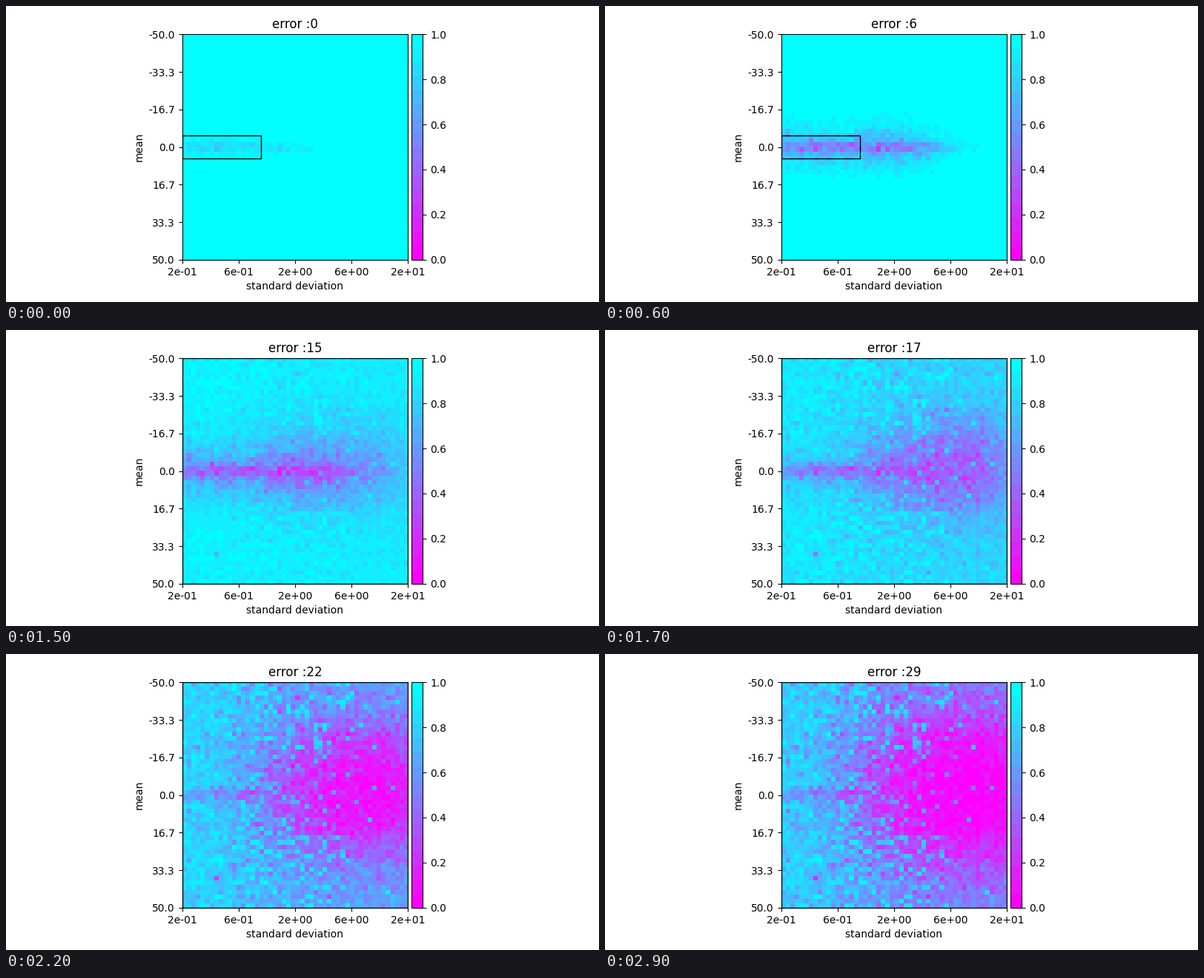
Write a matplotlib script that moves like this. It is 800 px wide and 400 px high and loops after 3000 ms.

```python
import numpy as np
import matplotlib.pyplot as plt
from matplotlib.animation import FuncAnimation
from matplotlib.patches import Rectangle

W, H, N, FRAMES, SWITCH = 800, 400, 50, 30, 15

fig = plt.figure(figsize=(W / 100, H / 100), dpi=100, facecolor="white")


def place(x, y, w, h):
    return fig.add_axes([x / W, y / H, w / W, h / H])


# Square map plus a bar of 5% its width, centred together
SIDE, GAP, BOTTOM = 304.5, 5, 57.2
left = (W - 1.05 * SIDE - GAP) / 2
ax = place(left, BOTTOM, SIDE, SIDE)
bar_ax = place(left + SIDE + GAP, BOTTOM, 0.05 * SIDE, SIDE)

# Cell centres: x spans the log-scaled deviation, m the mean
centres = (np.arange(N) + 0.5) / N
x, m = np.meshgrid(centres, centres * 100 - 50)

rng = np.random.default_rng(7)
narrow_gain = np.exp(rng.normal(0, 0.3, (N, N)))
wide_gain = np.exp(rng.normal(0, 1, (N, N)) * (0.45 - 0.25 * x))
stuck = rng.random((N, N)) < 0.16 * np.exp(-((x - 0.5) / 0.28) ** 2)
wide_gain[stuck] *= 0.25
narrow_gain[stuck] *= 0.7

KEYS = [0, 3, 9, 14, 15, 19, 22, 29]
STRENGTH = [0.19, 0.62, 0.88, 0.92, 0.9, 0.4, 0.4, 0.42]
SPREAD = [3.7, 4.3, 6, 6.8, 6.8, 2.2, 2, 2]
REACH = [0.5, 0.6, 0.68, 0.72, 0.72, 0.5, 0.45, 0.45]
WIDE = [0, 0, 0, 0, 0.3, 1.3, 2.2, 2.9]
HEIGHT = [20, 20, 20, 20, 20, 20, 24, 28]
RIGHT = [0.4, 0.4, 0.4, 0.4, 0.4, 0.4, 0.65, 0.8]


def rise(pos, mid, width):
    return 1 / (1 + np.exp((mid - pos) / width))


def error_map(i):
    strength, spread, reach, wide, height, right = (
        np.interp(i, KEYS, k)
        for k in (STRENGTH, SPREAD, REACH, WIDE, HEIGHT, RIGHT))
    bump = np.exp(-((x - 0.52) / 0.22) ** 2)
    late = min(i / 9, 1)

    # Narrow band learned from the small region
    band = np.exp(-np.abs(m) / (spread * (0.85 + 0.35 * bump * late)))
    band *= 1 + 0.2 * (np.abs(m) < 2)
    band *= (1 + 0.25 * late * (bump - 0.4)) * (1 - rise(x, reach, 0.09))

    # Broad area learned from the whole plane
    core = rise(x, 0.55, 0.1) * np.exp(-((m + 2) / height) ** 2)
    core *= 1 - (1 - right) * np.clip((x - 0.72) / 0.28, 0, 1) ** 2
    area = 0.12 * np.sqrt(wide) + wide * (0.13 * rise(x, 0.3, 0.1) + core)

    jitter = np.exp(np.random.default_rng(100 + i).normal(0, 0.05, (N, N)))
    learned = strength * band * narrow_gain + area * wide_gain
    return np.exp(-learned * jitter)


cmap = plt.get_cmap("cool_r", 16)
image = ax.imshow(error_map(0), cmap=cmap, vmin=0, vmax=1, aspect="auto",
                  extent=(0, 1, 1, 0), interpolation="nearest")
fig.colorbar(image, cax=bar_ax)

ax.set_xticks(np.linspace(0, 1, 5), ["2e-01", "6e-01", "2e+00", "6e+00", "2e+01"])
ax.set_yticks(np.linspace(0, 1, 7), [f"{v:.1f}" for v in np.linspace(-50, 50, 7)])
ax.set_xlabel("standard deviation")
ax.set_ylabel("mean")
title = ax.set_title("error :0")
region = ax.add_patch(Rectangle((0, 0.45), 0.35, 0.1, fill=False,
                                edgecolor="black", linewidth=1))


def update(i):
    image.set_data(error_map(i))
    title.set_text(f"error :{i}")
    region.set_bounds(*((0, 0.45, 0.35, 0.1) if i < SWITCH else (0, 0, 1, 1)))
    return image, title, region


anim = FuncAnimation(fig, update, frames=FRAMES, interval=100, repeat=True,
                     repeat_delay=0, blit=False)
plt.show()
```
